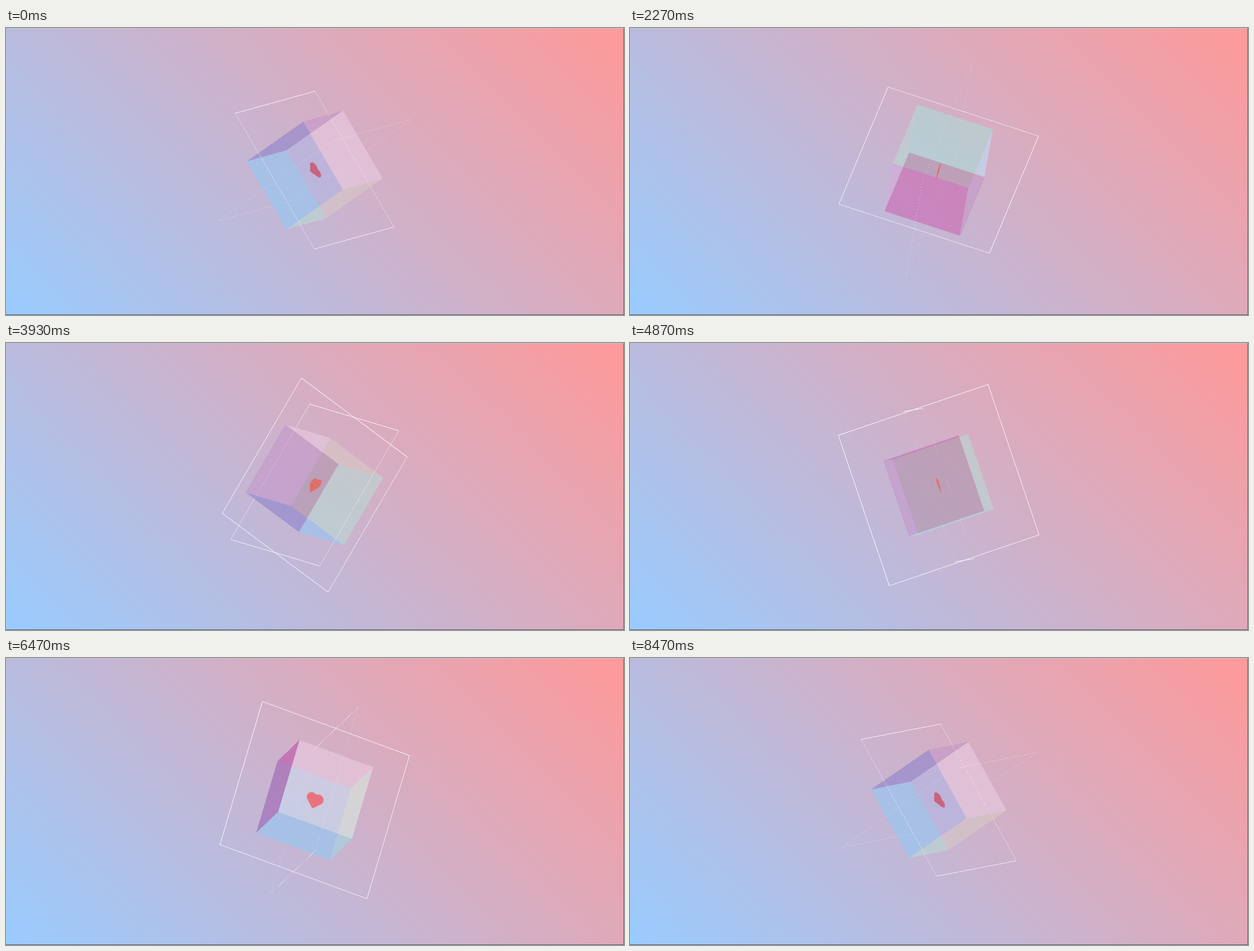
An HTML page that plays this animation: 1097x511 px, repeating every 8.54 s.

```html
<!DOCTYPE html>
<html lang="en">
<head>
<meta charset="utf-8">
<title>Heart in a glass cube</title>
<style>
  html, body { margin: 0; width: 100%; height: 100%; overflow: hidden; }

  .stage {
    position: relative;
    box-sizing: border-box;
    width: 100%;
    height: 100%;
    overflow: hidden;
    border: solid;
    border-width: 1px 1px 1px 0;
    border-color: #c6c3c9 #6c6468 #565a68;
    background: linear-gradient(45deg, #9cf, #f99) padding-box;
  }

  .cube {
    --side: 141.5px;
    --half: 70.75px;
    position: absolute;
    left: 548.2px;
    top: 251.7px;
    width: 0;
    height: 0;
    transform-style: preserve-3d;
  }

  .face, .frame { position: absolute; box-sizing: border-box; }

  .face {
    left: calc(-1 * var(--half));
    top: calc(-1 * var(--half));
    width: var(--side);
    height: var(--side);
  }
  .front  { background: rgba(230, 249, 250, .3); transform: translateZ(var(--half)); }
  .back   { background: rgba(160, 198, 240, .3); transform: rotateY(180deg) translateZ(var(--half)); }
  .right  { background: rgba(196, 242, 192, .3); transform: rotateY(90deg) translateZ(var(--half)); }
  .left   { background: rgba(138, 0, 130, .3);   transform: rotateY(-90deg) translateZ(var(--half)); }
  .top    { background: rgba(247, 148, 202, .3); transform: rotateX(90deg) translateZ(var(--half)); }
  .bottom { background: rgba(122, 206, 253, .3); transform: rotateX(-90deg) translateZ(var(--half)); }

  .frame {
    left: -142px;
    top: -142px;
    width: 284px;
    height: 284px;
    border: 1px solid #fff;
  }
  .frame.upright { transform: translateZ(0); }
  .frame.across { transform: rotateY(90deg); }

  .heart {
    position: absolute;
    left: 121px;
    top: 124px;
    width: 40px;
    height: 40px;
    fill: #e93846;
  }
</style>
</head>
<body>
<div class="stage">
  <div class="cube" id="cube">
    <div class="face front"></div>
    <div class="face back"></div>
    <div class="face right"></div>
    <div class="face left"></div>
    <div class="face top"></div>
    <div class="face bottom"></div>
    <div class="frame upright">
      <svg class="heart" viewBox="-20 -20 40 40">
        <path d="M0 13.4L-13.4 0A9.5 9.5 0 0 1 0-13.4A9.5 9.5 0 0 1 13.4 0Z"/>
      </svg>
    </div>
    <div class="frame across"></div>
  </div>
</div>
<script>
  const LOOP = 8540;
  const STEP = 1000 / 15;
  const LAST_STEP = 127;
  const TURN = 8247;   // duration of one full turn
  const LEAD = 145;    // time already elapsed in the turn when the loop starts

  const cube = document.getElementById('cube');

  // cubic-bezier(.42, 0, .58, 1), solved by bisection
  function easeInOut(x) {
    let low = 0, high = 1;
    for (let i = 0; i < 30; i++) {
      const s = (low + high) / 2;
      if (s * (1.26 + s * (-0.78 + s * 0.52)) < x) low = s;
      else high = s;
    }
    return low * low * (3 - 2 * low);
  }

  function draw(now) {
    const step = Math.min(LAST_STEP, Math.floor((now % LOOP + 5) / STEP));
    const phase = (step * STEP + LEAD) / TURN % 1;
    const angle = (45 + 360 * easeInOut(phase)).toFixed(3) + 'deg';
    cube.style.transform = `rotateX(${angle}) rotateY(${angle}) rotateZ(${angle})`;
  }

  const start = performance.now();
  function tick() {
    draw(performance.now() - start);
    requestAnimationFrame(tick);
  }
  tick();
</script>
</body>
</html>
```
